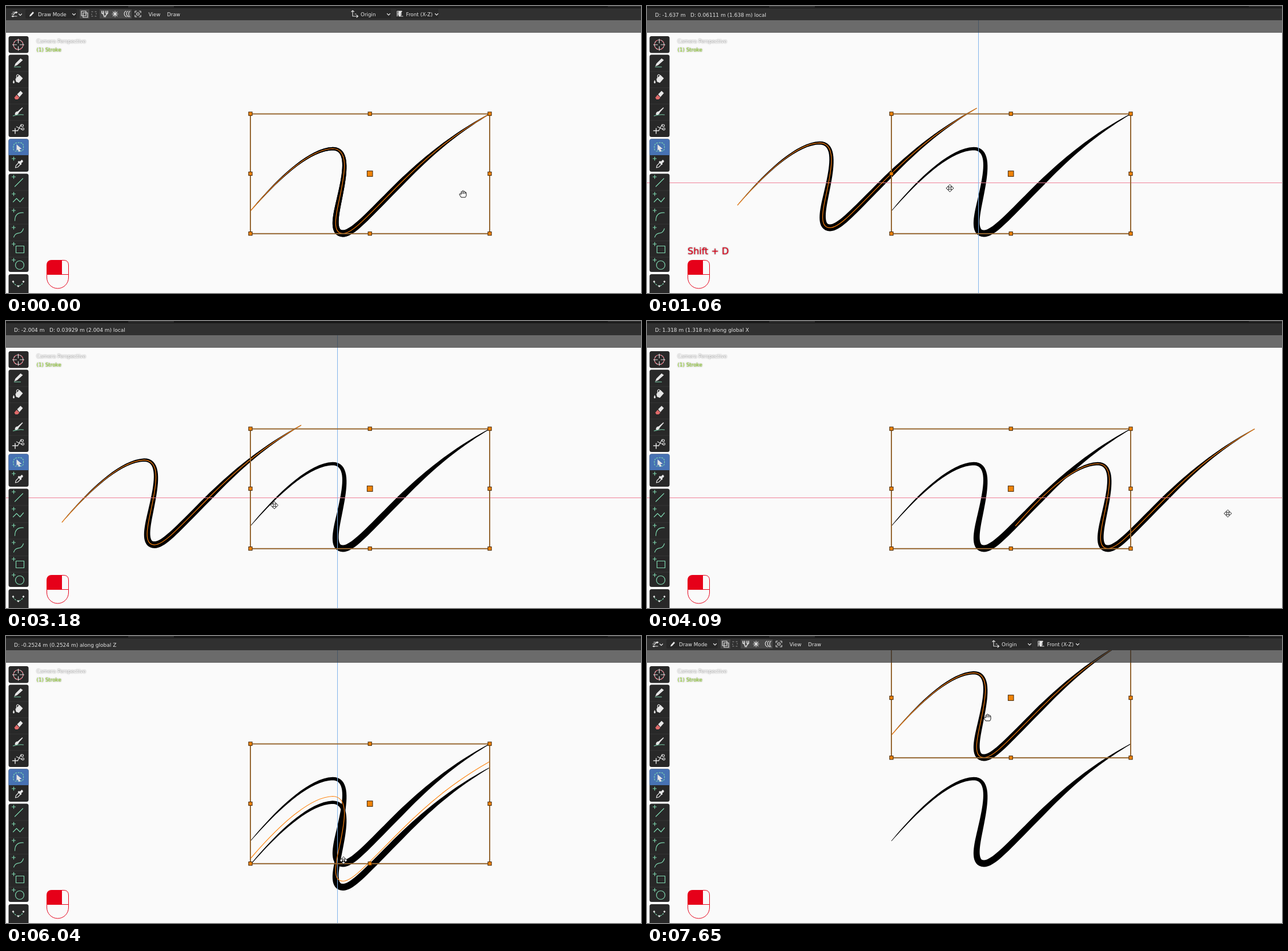
Recreate the animation shown at these times as an HTML page. Size 1112 by 504 pixels, loop 8000 ms.

```html
<!DOCTYPE html>
<html lang="en">
<head>
<meta charset="utf-8">
<title>Duplicating a stroke</title>
<style>
html, body { margin: 0; width: 100%; height: 100%; overflow: hidden; background: #fafafa; }
svg { display: block; width: 1112px; height: 504px; }
text { font: 8.8px "DejaVu Sans", sans-serif; white-space: pre; fill: #e4e4e4; }
.icon, .line { fill: none; stroke: #e0e0e0; stroke-width: 1.2; stroke-linecap: round; stroke-linejoin: round; }
.g { stroke: #7fd8b0; }
.w { fill: #e6e6e6; stroke: none; }
.red { stroke: #e60019; fill: none; }
.shade { filter: drop-shadow(0 .5px 1px #555); }
</style>
</head>
<body>
<svg viewBox="0 0 1112 504">
  <rect width="1112" height="504" fill="#fafafa"/>
  <path id="base"/>
  <g id="copy"><path id="copyInk"/></g>
  <path id="axisX" d="M0 310.5H1112" stroke="#f08098"/>
  <path id="axisZ" d="M580.5 25V504" stroke="#7fb2ea"/>
  <path id="thread" fill="none" stroke="#ff8410" stroke-width="1.2"/>
  <g id="box">
    <rect x="428" y="189.5" width="419" height="210.3" fill="none" stroke="#765838" stroke-width="2"/>
    <rect x="428" y="189.5" width="419" height="210.3" fill="none" stroke="#c07a28" stroke-width=".8"/>
    <g id="handles" fill="#f08408" stroke="#3b2208"/>
  </g>

  <rect y="25" width="1112" height="22" fill="#303030" opacity=".7"/>
  <rect width="1112" height="25" fill="#303030"/>
  <path d="M0 0H1112V4H0Z" fill="#181818"/>
  <path d="M214 0H294V2.5H214ZM1054 0H1112V1.5H1054Z" fill="#303030"/>
  <text id="status" x="14" y="18.5" style="font-size:9px"></text>

  <g id="menu">
    <path d="M37 5.5H121a3 3 0 0 1 3 3V19a3 3 0 0 1 -3 3H37a3 3 0 0 1 -3 -3V8.5a3 3 0 0 1 3 -3ZM604 5.5H674V22H604ZM683 5.5H757V22H683Z" fill="#282828"/>
    <path d="M129 6H146V22H129ZM164 6H220V22H164Z" fill="#484848"/>
    <g class="icon">
      <path d="M10 18H19M12 11H20M13 15L18 10M10 14H14M22.500 14L25 16.500L27.500 14M116.500 13.500L119 16L121.500 13.500M667.500 13.500L670 16L672.500 13.500M751.500 13.500L754 16L756.500 13.500"/>
      <circle cx="18" cy="11.500" r="1.500" class="w"/><circle cx="12" cy="18" r="1.500" class="w"/>
      <path d="M41 18.500L42 15.500L47 10L49 12L44 17.500Z" class="w"/>
      <path d="M132 9H140V17H132ZM135 12H143V20H135Z"/>
      <path d="M150 10H152M156 10H158M150 18H152M156 18H158M150 14V15M158 13V14" opacity=".6"/>
      <path d="M168 9V13H171V9M175 9V13H178V9M170 13C170 16 172 15 172 19M177 13C177 16 174 15 174 19" stroke-width="1.600"/>
      <path d="M186 14H196M191 9V19M187.500 10.500L194.500 17.500M194.500 10.500L187.500 17.500"/>
      <path d="M214 9C210 10 210 17 215 19M210 9C206 11 206 17 211 19M217 9C214 11 214 17 217 19"/>
      <path d="M226 12V9H229M233 9H236V12M236 16V19H233M229 19H226V16M229 12H233V16H229Z"/>
      <path d="M607 9V18H616M609.500 10L607 8L605 10M614 16L616.500 18L614 20M611 14H613"/>
      <path d="M685 9V18M688 18H695M686 9H693M687 12H692V16H687Z"/>
      <path d="M687 9H694L691 13V18H688Z" class="w"/>
    </g>
    <text x="56" y="17.500">Draw Mode</text>
    <text x="249.500" y="17.500">View</text>
    <text x="282" y="17.500">Draw</text>
    <text x="621" y="17.500">Origin</text>
    <text x="700.500" y="17.500">Front (X-Z)</text>
  </g>

  <g class="shade">
    <text x="53.500" y="64.500" style="font-size:8.6px;fill:#fff">Camera Perspective</text>
    <text x="53.500" y="79.500" style="fill:#9be02c">(1) Stroke</text>
  </g>

  <g id="panels" fill="#282828"></g>
  <path d="M5 115H39M5 143.500H39M5 172H39M5 201H39M5 324H39M5 354H39M5 383H39M5 412.500H39M5 441H39" stroke="#343434"/>
  <g id="tools" class="icon"></g>

  <text id="keys" x="71" y="435.500" style="font-size:16px;fill:#e60019" class="shade">Shift + D</text>
  <path d="M71.500 471.500V455Q71.500 446.500 80 446.500H97.500V471.500Z" fill="#e60019"/>
  <path class="red" d="M71.500 471.500V455Q71.500 446.500 80 446.500H101Q109.500 446.500 109.500 455V477A19 19 0 0 1 71.500 477ZH109.500M97.500 446.500V471.500"/>

  <g id="hand" fill="#fff" stroke="#111" stroke-width="1" stroke-linejoin="round">
    <path d="M-3 6L-6 1Q-6 -1 -4 0L-3 1V-3.500Q-2 -5.500 -1 -3.500V-5Q.500 -7 1.500 -5V-4Q3 -6 4 -3.500V-2.500Q5.500 -4 6 -2V3L4.500 6Z"/>
    <path d="M-1 -3.500V0M1.500 -4.500V0M4 -3V0"/>
  </g>
  <g id="mover" fill="#fff" stroke="#111" stroke-width="1" stroke-linejoin="round"></g>
</svg>
<script>
const $ = id => document.getElementById(id);
const SCALE = 164.7, LOOP = 8000;

// Pen curve: end points, control points and half widths at the joints
const pen = [
  [428,360, 458,325, 523,252, 572,250.5],
  [572,250.5, 603,251, 592,300, 584,338],
  [584,338, 579,362, 569,399.5, 590,399.5],
  [590,399.5, 607,399.5, 632,370, 690,312],
  [690,312, 745,257, 790,222, 847,189.5]];
const halfWidth = [.4, 2.8, 4.6, 6, 5.2, .5];

function inkOutline() {
  const left = [], right = [];
  pen.forEach(([ax, ay, bx, by, cx, cy, dx, dy], i) => {
    for (let k = 0; k <= 20; k++) {
      const t = k / 20, s = 1 - t;
      const mix = (a, b, c, d) => s*s*s*a + 3*s*s*t*b + 3*s*t*t*c + t*t*t*d;
      const slope = (a, b, c, d) => s*s*(b - a) + 2*s*t*(c - b) + t*t*(d - c);
      const x = mix(ax, bx, cx, dx), y = mix(ay, by, cy, dy);
      const u = slope(ax, bx, cx, dx), v = slope(ay, by, cy, dy);
      const w = (halfWidth[i] * s + halfWidth[i + 1] * t) / Math.hypot(u, v);
      left.push([x - v * w, y + u * w]);
      right.unshift([x + v * w, y - u * w]);
    }
  });
  return 'M' + left.concat(right).map(p => p.map(n => n.toFixed(2))).join('L') + 'Z';
}
const ink = inkOutline();
$('base').setAttribute('d', ink);
$('copyInk').setAttribute('d', ink);
$('thread').setAttribute('d', 'M428 360' + pen.map(p => 'C' + p.slice(2)).join(''));

const square = (x, y, r) => `<rect x="${x - r}" y="${y - r}" width="${2 * r}" height="${2 * r}"/>`;
let marks = square(637.2, 294.5, 4.8);
for (const x of [428, 637.2, 847])
  for (const y of [189.2, 294.5, 399.7])
    if (x !== 637.2 || y !== 294.5) marks += square(x, y, 3.1);
$('handles').innerHTML = marks;

$('panels').innerHTML = [[53, 82.5], [85.5, 230], [233.5, 291], [294.5, 467], [471, 510]]
  .map(([a, b]) => `<rect x="4.500" y="${a}" width="35" height="${b - a}" rx="3.500"/>`).join('') +
  '<path d="M4.500 262V237Q4.500 233.500 8 233.500H36Q39.500 233.500 39.500 237V262Z" fill="#4772b3"/>';

const plus = '<path class="g" d="M-11 -9H-5M-8 -12V-6"/>';
const tools = [
  [68, '<circle r="8.500" stroke="#ddd"/><circle r="8.500" stroke="#d05060" stroke-dasharray="3.300"/><path d="M0 -10V-3M0 3V10M-10 0H-3M3 0H10"/>'],
  [99, '<path class="w" d="M-7 7L-5 2L4 -7L8 -4L-2 5Z"/><path class="g" d="M-7 8H4" stroke="#bbb"/>'],
  [128, '<path class="w" d="M-5 0L2 -7L8 -1L1 7L-4 5Z"/><path d="M-3 1V-6Q0 -10 2 -4" /><path class="w" d="M-8 2Q-11 7 -8 8Q-5 7 -8 2Z"/>'],
  [157, '<path class="w" d="M-2 -2L4 -8L8 -4L2 3Z"/><path d="M-3 -1L2 4L-1 7H-5L-7 4Z" fill="#e06a6a" stroke="none"/>'],
  [186, '<path class="w" d="M-6 5Q-6 -1 -1 -1L7 -8L8 -7L1 1Q0 6 -6 5Z"/><path class="g" d="M-9 7Q0 4 9 5"/>'],
  [215, '<path d="M-3 -3L7 2M-1 4L5 -7"/><circle cx="7" cy="-5" r="2"/><circle cx="8" cy="1" r="2"/><path d="M-10 4H-1M-5.500 0V9" stroke-width="1.500"/>'],
  [248, '<path class="g" stroke="#a8c8a0" stroke-dasharray="2 2.500" d="M-8 5Q-11 -8 0 -8Q10 -9 9 1Q9 7 3 7H-6"/><path class="w" d="M-3 -5L6 3H2L4 7L1 8L-1 4L-3 6Z"/>'],
  [277, plus + '<path d="M-5 7L-4 3L2 -3L5 0L-1 6Z"/><path class="w" d="M1 -5L3 -4L6 -7Q9 -6 8 -3L5 -1L6 1L4 2L-1 -3Z"/>'],
  [309, plus + '<path class="g" d="M-6 8L8 -6"/>'],
  [339, plus + '<path class="g" d="M-9 5L-3 -1L3 5L9 -2"/>'],
  [368, plus + '<path class="g" d="M-6 9Q-6 -6 9 -5"/>'],
  [398, plus + '<path class="g" d="M-8 8C-4 -4 5 6 9 -7"/>'],
  [427, plus + '<rect class="g" x="-4" y="-5.500" width="14" height="12"/>'],
  [455, plus + '<circle class="g" cx="2.500" r="7.500"/>'],
  [488, '<path class="g" stroke-dasharray="2 2.500" d="M-9 -3Q0 10 9 -3"/><path class="w" d="M-11 -4L-9 -6L-7 -4L-9 -2ZM7 -4L9 -6L11 -4L9 -2ZM-2 4L0 2L2 4L0 6Z"/>']];
$('tools').innerHTML = tools.map(([y, art]) => `<g transform="translate(21.500 ${y})">${art}</g>`).join('');

$('mover').innerHTML = [0, 90, 180, 270]
  .map(a => `<path transform="rotate(${a})" d="M0 -6.500L3 -3.500L0 -1.500L-3 -3.500Z"/>`).join('') + '<circle r="1" stroke="none"/>';

// Free drag: time, metres along X, metres along Z
const free = [
  [150, -.0182, .00607], [280, -.1518, .02065], [400, -.4068, .03643], [560, -.7833, .05465],
  [700, -1.063, .05707], [820, -1.305, .05889], [940, -1.518, .06011], [1060, -1.637, .06111],
  [1510, -1.736, .05525], [1630, -1.858, .04857], [1760, -1.955, .0425], [1910, -2.004, .03929]];
// Locked to X: time, metres, pointer y
const alongX = [
  [3300, -2.004, 324], [3700, -1.821, 326], [3820, -.9107, 331], [3940, .0789, 335], [4090, 1.318, 338],
  [4240, 1.154, 336], [4360, .3643, 328], [4480, -.5465, 318], [4600, -1.184, 310]];
// Locked to Z: time, metres, pointer x and y
const alongZ = [
  [5020, .0668, 602, 306], [5410, .07836, 602, 300], [5530, .085, 601, 312], [5650, -.0182, 599, 340],
  [5800, -.1093, 595, 362], [5920, -.1882, 593, 382], [6040, -.2524, 591, 394], [6160, -.4493, 592, 404],
  [6280, -.1821, 594, 330], [6400, .5465, 596, 220], [6530, 1.129, 596, 143]];

const num = v => +v.toPrecision(4);
const last = (list, t) => list.findLastIndex(k => k[0] <= t);
const locked = (v, axis) => `D: ${num(v)} m (${num(Math.abs(v))} m) along global ${axis}`;

function pose(t) {
  if (t < 150) return { x: 0, z: 0, px: 800, py: 330 };
  if (t < 3300) {
    const [, x, z] = free[last(free, t)];
    return { x, z, px: 800 + x * SCALE, py: 330 - z * SCALE, axes: 'XZ',
      status: `D: ${num(x)} m   D: ${num(z)} m (${num(Math.hypot(x, z))} m) local` };
  }
  if (t < 5020) {
    const [, x, py] = alongX[last(alongX, t)];
    return { x, z: 0, px: 800 + x * SCALE, py, axes: 'X', status: locked(x, 'X') };
  }
  const i = last(alongZ, t), [, z, px, py] = alongZ[i];
  if (t >= 7530) return { x: 0, z, px, py, done: true };
  const settled = i === 0 || i === alongZ.length - 1;
  return { x: 0, z, px, py, axes: 'Z', status: locked(z, 'Z'), threadZ: settled ? z : alongZ[i - 1][1] };
}

const show = (id, on) => $(id).setAttribute('visibility', on ? 'visible' : 'hidden');
const move = (id, x, y) => $(id).setAttribute('transform', `translate(${x.toFixed(2)} ${y.toFixed(2)})`);

function draw(now) {
  const t = now % LOOP, p = pose(t), axes = p.axes || '';
  move('copy', p.x * SCALE, -p.z * SCALE);
  move('thread', p.x * SCALE, -(p.threadZ ?? p.z) * SCALE);
  move('box', 0, p.done ? -p.z * SCALE : 0);
  move('hand', p.px, p.py);
  move('mover', p.px, p.py);
  const idle = t < 150 || t >= 7650;
  show('hand', idle);
  show('mover', !idle);
  show('menu', !axes);
  show('axisX', axes.includes('X'));
  show('axisZ', axes.includes('Z'));
  show('keys', t >= 150 && t < 3180);
  $('status').textContent = p.status || '';
}

const start = performance.now();
function frame() {
  draw(performance.now() - start);
  requestAnimationFrame(frame);
}
frame();
</script>
</body>
</html>
```
